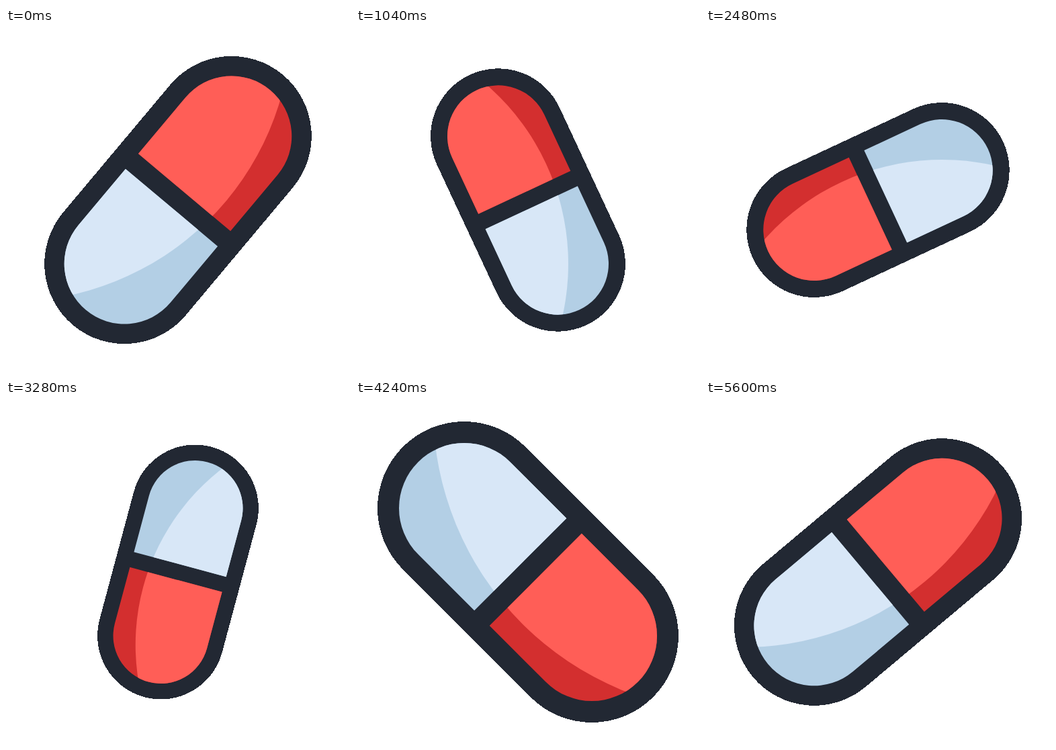
Recreate the animation shown at these times as an HTML page. Size 512 by 512 pixels, loop 5.68 s.

```html
<!DOCTYPE html>
<html lang="en">
<head>
<meta charset="utf-8">
<title>Spinning pill</title>
<style>
  @property --turn {
    syntax: '<angle>';
    inherits: false;
    initial-value: 5deg;
  }

  html, body {
    margin: 0;
    width: 100%;
    height: 100%;
    overflow: hidden;
    background: #fff;
  }

  /* The pill shrinks so that its turned square box always fits the stage. */
  .pill {
    --cos: cos(var(--turn));
    --sin: sin(var(--turn));
    display: block;
    width: 100%;
    height: 100%;
    overflow: visible;
    transform:
      rotate(calc(-45deg - var(--turn)))
      scale(calc(1 / (max(var(--cos), -1 * var(--cos)) + max(var(--sin), -1 * var(--sin)))));
    animation: spin 5680ms steps(71) infinite;
  }

  @keyframes spin {
    from { --turn: 5deg; }
    to { --turn: 360deg; }
  }

  .shell { fill: #222833; shape-rendering: crispEdges; }
  .shade { --white: #b3cfe5; --red: #d32f2f; }
  .lit { --white: #d8e7f7; --red: #ff5e57; }
  .white { fill: var(--white); }
  .red { fill: var(--red); }
</style>
</head>
<body>
<svg class="pill" viewBox="-256 -256 512 512">
  <defs>
    <clipPath id="inside">
      <rect x="-231.35" y="-97" width="462.7" height="194" rx="97"/>
    </clipPath>
    <clipPath id="light">
      <circle cx="48.3" cy="-392.5" r="453"/>
    </clipPath>
    <g id="halves">
      <rect class="white" x="-240" y="-100" width="224" height="200"/>
      <rect class="red" x="16" y="-100" width="224" height="200"/>
    </g>
  </defs>
  <rect class="shell" x="-263.35" y="-129" width="526.7" height="258" rx="129"/>
  <g clip-path="url(#inside)">
    <use class="shade" href="#halves"/>
    <g clip-path="url(#light)">
      <use class="lit" href="#halves"/>
    </g>
  </g>
</svg>
</body>
</html>
```
